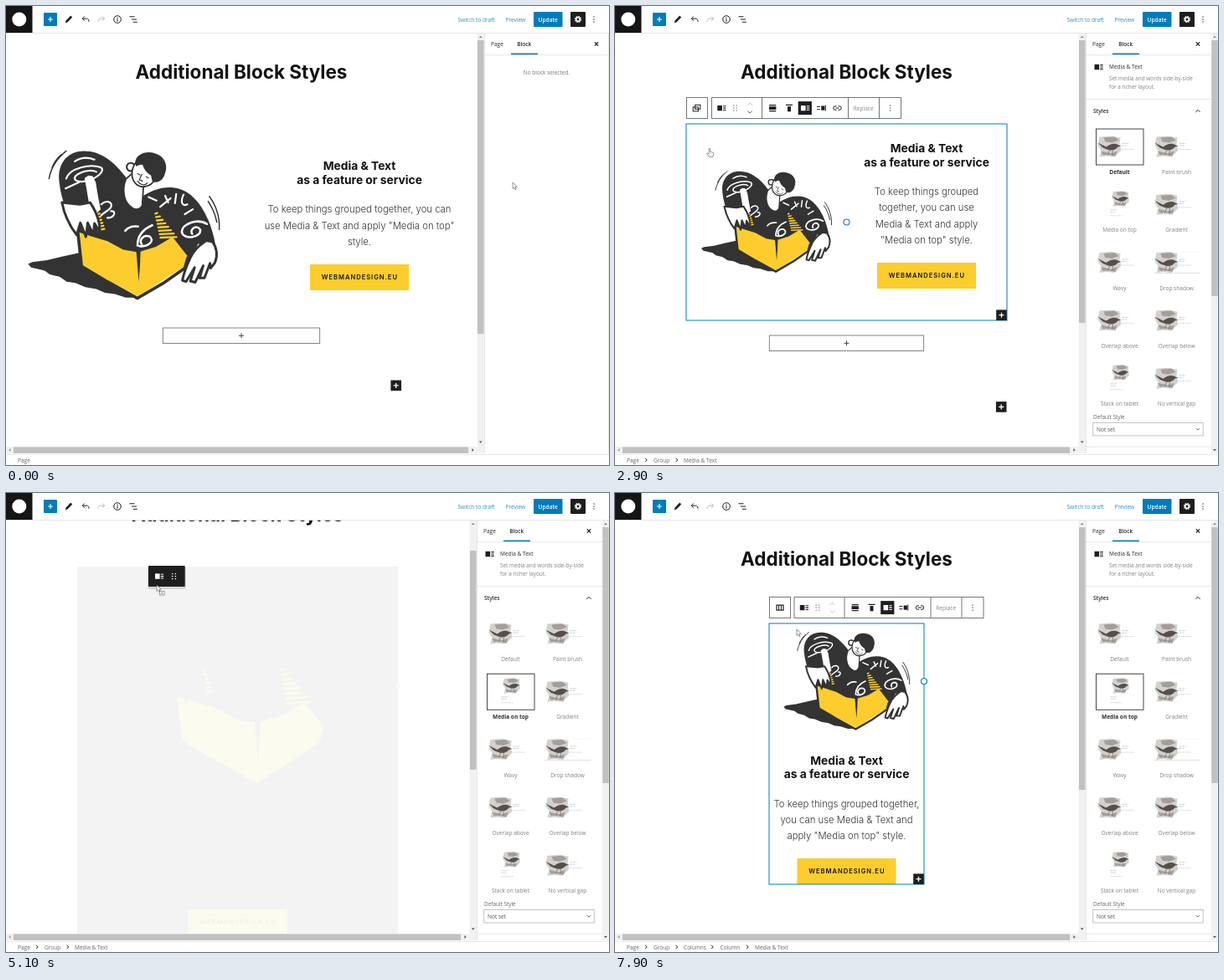
These frames come from a looping animation (720x549 px, 8000 ms). An HTML page:

```html
<!DOCTYPE html>
<html lang="en">
<head>
<meta charset="utf-8">
<title>Block editor</title>
<style>
html, body { margin: 0; width: 100%; height: 100%; overflow: hidden; background: #fff; }
svg { display: block; font: 6.55px "Open Sans", "Noto Sans", sans-serif; fill: #2c2c2c; }
.page { font-family: Inter, "Open Sans", sans-serif; text-anchor: middle; --ink: #333; --paper: #fff; --sun: #fccd2d; --text: #111; }
.ghost { --ink: #f3f3f3; --paper: #f3f3f3; --sun: #fbfbf0; --text: #f2f2e9; }
.ink { fill: var(--ink); }
.sun { fill: var(--sun); }
.line { fill: none; stroke: var(--ink); stroke-linecap: round; stroke-linejoin: round; }
.chalk { fill: none; stroke: var(--paper); stroke-linecap: round; }
.skin { fill: var(--paper); stroke: var(--ink); stroke-linejoin: round; }
</style>
</head>
<body>
<svg width="720" height="549" viewBox="0 0 720 549">
  <defs>
    <clipPath id="view"><rect id="viewBox" y="32.5" height="494.5"/></clipPath>
    <g id="art">
      <path class="ink" d="M121 347 L128 344 L152 341 L176 335 L204 329 L211 351 L298 402 L280 402 L262 396 L246 394 L232 388 L214 385 L198 378 L184 376 L172 368 L156 364 L148 358 L126 353Z"/>
      <path class="line" stroke-width="2" d="M155 208 C158 192 168 175 183 163 M160 190 C164 180 170 173 175 169 M416 237 C427 252 433 272 432 291 M414 245 C422 257 426 268 428 279"/>
      <path class="ink" d="M172 216 C167 185 184 163 212 163 C240 163 262 181 281 207 L306 238 C322 226 346 218 368 225 C394 233 412 264 420 292 C426 312 428 322 421 326 L398 314 L384 340 L357 320 L300 350 L206 310 C190 277 175 246 172 216Z"/>
      <path class="chalk" stroke-width="3" d="M197 180 C207 173 219 173 229 177 M183 208 C188 191 222 183 240 190 C249 199 216 219 199 211 C188 203 219 190 232 197 M182 224 L204 214 M240 250 C248 242 259 246 256 254 C253 260 244 263 240 268 M250 272 C262 272 265 260 256 261 M317 238 L330 244 M336 254 L353 240 M344 236 L349 247 M362 233 L360 248 M374 234 C368 246 372 254 380 250 M376 266 L389 258"/>
      <path class="chalk" stroke-width="3.5" d="M412 282 C396 272 371 282 371 295 C374 309 404 304 401 291 C395 282 383 291 388 298 M299 317 C299 300 309 290 323 284 M302 318 C318 320 328 308 318 302 C308 299 301 309 306 315 M279 293 C284 287 292 285 300 286"/>
      <path d="M213 207 L219 203 L226 204 L231 214 L235 238 L239 258 L232 265 L222 260Z" fill="var(--paper)"/>
      <g id="stripes" stroke="var(--sun)" stroke-width="3.2" stroke-linecap="round"></g>
      <path class="sun" d="M202 295 L224 302 L250 310 L276 324 L300 328 L329 319 L356 303 L381 335 L374 352 L300 400 L208 351Z"/>
      <path class="line" stroke-width="5" d="M202 296 L208 351 L250 376 L299 403 L340 379 L376 354 L381 337"/>
      <path class="ink" d="M297 326 L304 325 L303 350 L301 376 L299 350Z"/>
      <path class="skin" stroke-width="4" d="M176 247 C180 268 188 284 200 300 L206 280 L215 303 L218 280 L227 299 L229 281 L238 295 C238 280 232 262 222 247 L205 250Z"/>
      <path class="skin" stroke-width="4" d="M411 309 C399 317 390 325 385 337 C379 350 374 363 372 374 L378 376 L392 353 L385 375 L393 377 L406 350 L400 370 L408 370 L417 346 L418 354 L425 345 C430 333 428 320 421 311Z"/>
      <path class="skin" stroke-width="2.5" d="M280 209 C273 228 277 248 291 256 C299 261 308 256 307 246 L309 216 L292 198Z"/>
      <circle class="skin" cx="288" cy="189" r="6.5" stroke-width="3"/>
      <path class="skin" stroke-width="2.5" d="M295 183 C288 195 288 209 297 217 C306 225 321 221 327 210 L325 186Z"/>
      <path class="ink" d="M295 184 C295 167 314 162 328 167 C343 171 349 186 344 199 C341 212 330 217 323 212 L321 203 C313 198 309 192 307 184 L297 188Z"/>
      <path class="line" stroke-width="1.6" d="M299 200 L303 202 M313 205 L317 207 M306 201 L302 210 L307 212 M299 212 C304 219 311 220 315 215"/>
    </g>
    <g id="photo">
      <path fill="#d3d0cd" d="M-24 -12 L-10 -13 L1 -11 L0 -3 L2 4 L-3 9 L-6 12 L-16 11 L-24 12 L-22 4 L-26 -2Z"/>
      <path fill="#a29e9a" d="M-19 -11 L-6 -12 L-1 -8 L-9 -5 L-17 -6Z M-22 5 L-10 8 L-3 5 L-5 11 L-14 9 L-20 10Z"/>
      <path fill="#56504c" d="M-26 -5 L-16 0 C-11 -4 -5 -5 -1 -2 L2 -1 L-2 0 C-5 4 -10 5 -15 3 L-20 1Z"/>
      <path fill="none" stroke="#77706b" stroke-width=".8" d="M-12 4 L-14 10 M-8 4 L-9 10"/>
    </g>
    <g id="tiny" fill="none" stroke="#bbb" stroke-width=".7"><path d="M0 0h8M0 2.5h6" stroke-dasharray="3 .7"/><path d="M0 7h14" stroke-dasharray="1.5 1"/></g>
  </defs>
  <g id="scene"></g>
</svg>
<script>
const LOOP = 8000, BLUE = '#007cba', DARK = '#1e1e1e', EDGE = '#777';
const $ = id => document.getElementById(id);

const rect = (x, y, w, h, fill, more = '') => `<rect x="${x}" y="${y}" width="${w}" height="${h}" fill="${fill}" ${more}/>`;
const frame = (x, y, w, h, color = DARK, sw = .8, fill = 'none') => rect(x, y, w, h, fill, `stroke="${color}" stroke-width="${sw}"`);
const text = (x, y, s, more = '') => `<text x="${x}" y="${y}" ${more}>${s}</text>`;
const path = (x, y, d, color = DARK, sw = 1) => `<path transform="translate(${x} ${y})" d="${d}" fill="none" stroke="${color}" stroke-width="${sw}"/>`;
const shape = (x, y, d, fill = DARK) => `<path transform="translate(${x} ${y})" d="${d}" fill="${fill}"/>`;
const use = (id, x, y, s = 1) => `<use href="#${id}" transform="translate(${x} ${y}) scale(${s})"/>`;
const plus = (x, y, r, color, sw = 1) => path(x, y, `M${-r} 0H${r}M0 ${-r}V${r}`, color, sw);
const inserter = (x, y) => rect(x - 6.3, y - 6.3, 12.6, 12.6, DARK) + plus(x, y, 3, '#fff', 1.3);
const dots = (x, y, cols, gap, color = DARK) => {
  let d = '';
  for (let c = 0; c < cols; c++) for (let r = -1; r < 2; r++) d += `M${(c - (cols - 1) / 2) * gap - .7} ${r * 3 - .7}h1.4v1.4h-1.4z`;
  return shape(x, y, d, color);
};
const mediaIcon = (x, y, color = DARK) => shape(x, y, 'M-5 -3.2h5.6v6.4h-5.6z', color) + path(x, y, 'M1.8 -2.4h3.4M1.8 0h3.4M1.8 2.4h3.4', color, 1.1);

// Piecewise linear value from [time, x, y...] keys.
function along(keys, t) {
  const i = keys.findIndex(k => k[0] > t);
  if (i === 0) return keys[0].slice(1);
  if (i < 0) return keys[keys.length - 1].slice(1);
  const a = keys[i - 1], b = keys[i], u = (t - a[0]) / (b[0] - a[0]);
  return a.slice(1).map((v, n) => v + (b[n + 1] - v) * u);
}

const pointerKeys = [[0, 605, 211], [400, 200, 268], [1500, 200, 268], [1800, 103, 146], [2000, 103, 139], [2200, 103, 139],
  [2400, 113, 185], [2500, 113, 171], [3000, 113, 171], [3500, 606, 240], [3900, 606, 241], [4800, 143, 69], [5100, 180, 110],
  [5500, 250, 508], [5700, 264, 470], [6000, 270, 244], [6400, 273, 194], [7400, 273, 194], [7900, 217, 163]];
const chipKeys = [[4900, 137, 58], [5100, 170, 87], [5500, 235, 440], [5700, 262, 470], [6000, 274, 290], [6400, 274, 190], [6700, 272, 185]];
const scrollKeys = [[4000, 0], [4300, 53], [5200, 53], [5700, 362], [6000, 362], [6400, 405], [6900, 405], [7000, 123], [7400, 123], [7800, 0]];

// gap: from the last block down to the closing inserter
const states = [
  { until: 1200, w: 562, x: 0, bw: 562, top: 158, bottom: 367, art: [0, 157.3, .7337], head: [422, 191.2], size: 671, gap: 50.4,
    lines: ['To keep things grouped together, you can', 'use Media & Text and apply "Media on top"', 'style.'] },
  { until: 2700, w: 553, x: 0, bw: 553, top: 156, bottom: 372, art: [0, 160.4, .722], head: [415, 184.8], size: 693, gap: 67, outline: true,
    lines: ['To keep things grouped together, you can', 'use Media & Text and apply "Media on', 'top" style.'] },
  { until: 3700, w: 553, x: 85, bw: 383, top: 141, bottom: 376, art: [85, 186.7, .5], head: [372, 170], size: 697, gap: 67, outline: true,
    lines: ['To keep things grouped', 'together, you can use', 'Media & Text and apply', '"Media on top" style.'] },
  { until: 7000, w: 553, x: 85, bw: 383, top: 141, bottom: 582, art: [85, 141, 1], head: [276.5, 453], size: 900, gap: 67,
    lines: ['To keep things grouped together, you can use Media & Text and apply', '"Media on top" style.'] },
  { until: LOOP, w: 553, x: 184, bw: 185, top: 156, bottom: 468, art: [184, 156, .483], head: [276.5, 319.5], size: 750, gap: 67, outline: true, column: true,
    lines: ['To keep things grouped together,', 'you can use Media & Text and', 'apply "Media on top" style.'] }
];

function header() {
  return rect(0, 0, 720, 32, '#fff') + rect(0, 32, 720, .7, '#ddd') + rect(0, 0, 31.5, 32, '#151515') +
    '<circle cx="15.8" cy="16" r="8.5" fill="#fff"/>' +
    rect(45, 8, 16, 16, BLUE, 'rx="1"') + plus(53, 16, 3, '#fff', 1.2) +
    shape(75, 16, 'M-4.2 4.5L-3.2 1.2 2.2 -4.4 4.2 -2.6 -1.4 3.2Z') +
    path(95, 16, 'M-1.2 -3.4L-3.8 -.9 -1.2 1.6M-3.8 -.9H1.2C3.4 -.9 4 .6 4 2.8') +
    path(114, 16, 'M1.2 -3.4L3.8 -.9 1.2 1.6M3.8 -.9H-1.2C-3.4 -.9 -4 .6 -4 2.8', '#bbb') +
    '<circle cx="133" cy="16" r="4.3" fill="none" stroke="#1e1e1e"/>' + path(133, 16, 'M0 -2.4v1.2M0 -.4v2.8', DARK, 1.1) +
    path(152, 16, 'M-4.5 -3.2h6M-2 0h6M-.2 3.2h5', DARK, 1.1) +
    text(539.5, 18.8, 'Switch to draft', 'fill="#2b8fc4"') + text(596.5, 18.8, 'Preview', 'fill="#2b8fc4"') +
    rect(630, 7, 34.5, 18, BLUE, 'rx="1"') + text(647.2, 18.6, 'Update', 'fill="#fff" font-weight="600" text-anchor="middle"') +
    rect(674, 7, 18, 18, DARK, 'rx="1"') +
    '<circle cx="683" cy="16" r="2.3" fill="none" stroke="#fff" stroke-width="1.7"/><circle cx="683" cy="16" r="3.6" fill="none" stroke="#fff" stroke-width="1.2" stroke-dasharray="1.4 1.43"/>' +
    dots(702, 16, 1, 0, '#666');
}

function footer(names) {
  const xs = [14, 46, 82, 125.5, 167], seps = [37, 73.5, 116, 158];
  return rect(0, 535, 720, 14, '#fff') + rect(0, 536, 720, .7, '#ddd') + names.map((n, i) =>
    text(xs[i], 545.6, n, 'fill="#666"') + (i ? path(seps[i - 1], 543, 'M-1 -2.2L1.2 0 -1 2.2') : '')).join('');
}

function scrollbars(s, scroll) {
  const x = s.w + .5, ratio = 476 / s.size, up = 'M-2 1L0 -1.2 2 1Z', down = 'M-2 -1L0 1.2 2 -1Z', grey = '#555';
  return rect(x, 32.5, 8.5, 502.5, '#f1f1f1') + rect(x + .5, 41 + scroll * ratio, 7.5, 495 * ratio, '#c1c1c1') +
    shape(x + 4.2, 37, up, '#888') + shape(x + 4.2, 521.5, down, grey) +
    rect(0, 527, x, 8, '#f1f1f1') + rect(9, 527.5, s.w - 19, 7.5, '#c1c1c1') +
    shape(4.5, 531, 'M1 -2L-1.2 0 1 2Z', '#999') + shape(s.w - 4.5, 531, 'M-1 -2L1.2 0 -1 2Z', grey);
}

function tabs(x) {
  return text(x + 8, 48, 'Page') + text(x + 39.2, 48, 'Block', 'font-weight="600"') + rect(x + 32, 56.5, 32, 1.6, BLUE) +
    rect(x, 58.4, 720 - x, .7, '#ddd') + path(x + 134, 45.3, 'M-2.2 -2.2L2.2 2.2M-2.2 2.2L2.2 -2.2', DARK, 1.1);
}

const styleNames = ['Default', 'Paint brush', 'Media on top', 'Gradient', 'Wavy', 'Drop shadow', 'Overlap above', 'Overlap below', 'Stack on tablet', 'No vertical gap'];

function sidebar(t, open) {
  const x = open ? 562 : 571;
  let out = rect(x, 32.7, 720 - x, 503, '#fff') + rect(x, 32.7, .7, 503, '#ddd') + tabs(x);
  if (!open) return out + text(645.5, 82.4, 'No block selected.', 'text-anchor="middle" fill="#777"') + rect(719.3, 32, .7, 504, '#ddd');
  const grey = 'fill="#808080"', chosen = t < 3700 ? 0 : 2;
  out += mediaIcon(577.5, 73) + text(590, 75.4, 'Media & Text', 'font-weight="500"') +
    text(590, 88.8, 'Set media and words side-by-side', grey + ' font-size="6.4"') + text(590, 98.9, 'for a richer layout.', grey + ' font-size="6.4"') +
    rect(562, 111.2, 150, .7, '#ddd') + text(571, 128, 'Styles', 'font-weight="600"') + path(696, 125.5, 'M-2.6 1.4L0 -1.2 2.6 1.4');
  styleNames.forEach((name, i) => {
    const cx = 602.5 + i % 2 * 68, cy = 168.5 + (i >> 1) * 69.3, stacked = i === 2 || i === 8;
    if (stacked) out += use('photo', cx + 10, cy - 7, .74) + use('tiny', cx - 11, cy + 6);
    else out += use('photo', cx, cy) + use('tiny', cx + 3, cy - 4);
    if (i === 5) out += rect(cx - 27, cy + 12, 55, .6, '#ccc') + rect(cx - 3, cy - 13, 31, .5, '#eee');
    if (i === chosen) out += frame(cx - 28, cy - 21.5, 56.5, 43, '#333', .9);
    out += text(cx, cy + 32.4, name, `text-anchor="middle" ${i === chosen ? 'font-weight="700"' : grey}`);
  });
  if (t >= 3700 && t < 4900) out += rect(570.5, 212, 64.5, 66, 'none', `rx="1" stroke="${BLUE}"`);
  return out + text(571, 494, 'Default Style', 'fill="#666" font-size="6.4"') + frame(570.8, 498.6, 131.4, 15.4, '#aaa', .7) +
    text(575, 508.6, 'Not set', 'fill="#555"') + path(696, 506.2, 'M-2 -1L0 1 2 -1', '#666') + rect(562, 526.8, 150, .7, '#ddd') +
    rect(711.8, 32.7, 8.2, 503, '#f1f1f1') + rect(712.3, 41, 7.4, 306, '#c1c1c1') +
    shape(716, 37, 'M-2 1L0 -1.2 2 1Z', '#888') + shape(716, 531, 'M-2 -1L0 1.2 2 -1Z', '#555');
}

function toolbar(s, y, t) {
  const x = s.x + (s.column ? 29.5 : 30), m = y + 12.6, align = t >= 1800 && t < 2700 ? BLUE : DARK;
  const split = dx => rect(x + dx, y, 1, 25, EDGE);
  const owner = s.column
    ? frame(s.x + 9, m - 3, 8, 6, DARK, 1.2) + path(s.x + 13, m, 'M-1.4 -3v6M1.4 -3v6', DARK, 1)
    : frame(s.x + 10.6, m - 3.8, 6.2, 5, DARK, 1) + frame(s.x + 8.2, m - 1.2, 6.2, 5, DARK, 1);
  const wide = t < 2700 ? 'M-3.5 -4.2h7M-3.5 4.2h7' : 'M-4 -3.5h8M-4 3.5h8';
  return frame(s.x + .5, y, 25, 25, EDGE, 1, '#fff') + owner + frame(x + .5, y, 226, 25, EDGE, 1, '#fff') +
    mediaIcon(x + 12.3, m) + dots(x + 28.5, m, 2, 3.6, '#888') +
    path(x + 46, m, 'M-2.8 -3.4L0 -6 2.8 -3.4', '#bbb', .9) + path(x + 46, m, 'M-2.8 3.4L0 6 2.8 3.4', s.column ? '#bbb' : '#555', .9) +
    split(60) + rect(x + 69, m - 1.9, 8.4, 3.8, align) + path(x + 73.2, m, wide, align, 1.1) +
    path(x + 93, m, 'M-4 -3.8h8', DARK, 1.2) + rect(x + 91, m - 2, 4, 6.2, DARK) +
    rect(x + 103.7, m - 8, 16.2, 16, DARK) + mediaIcon(x + 112, m, '#fff') +
    rect(x + 131.2, m - 2.6, 4.2, 5.2, DARK) + path(x + 131, m, 'M-5 -1.6h3.8M-5 1.6h3.8', DARK, 1) + rect(x + 135.8, m - 3.5, 1, 7, DARK) +
    path(x + 150.5, m, 'M-1 -2.3h-1.4a2.3 2.3 0 0 0 0 4.6h1.4M1 -2.3h1.4a2.3 2.3 0 0 1 0 4.6h-1.4M-2 0h4') +
    split(163) + text(x + 169.8, m + 2.4, 'Replace', 'fill="#888"') + split(200) + dots(x + 213.5, m, 1, 0, '#666');
}

function alignMenu(t) {
  const row = (y, name, on) => (on ? rect(94, y - 9, 72, 18, '#f0f0f0') : '') +
    rect(99.5, y - 1.8, 8, 3.6, DARK) + path(103.5, y, 'M-3.5 -4h7M-3.5 4h7') + text(113, y + 2.3, name);
  return frame(91.5, 153.5, 78, 46, EDGE, 1, '#fff') + row(165, 'Wide width', t >= 2500) + row(187, 'Full width', t < 2500);
}

function block(s, ghost, selected) {
  const [hx, hy] = s.head, last = hy + 52 + (s.lines.length - 1) * 19.3, by = Math.round(last + 27);
  const bold = 'font-size="13.8" font-weight="700" fill="var(--text)"';
  let out = ghost ? rect(s.x, s.top, s.bw, s.bottom - s.top, '#f3f3f3') : '';
  const [ax, ay, k] = s.art;
  out += `<use href="#art" transform="translate(${ax} ${ay}) scale(${k}) translate(-85 -141)"/>`;
  if (!ghost) {
    out += text(hx, hy + 5, 'Media & Text', bold) + text(hx, hy + 21.7, 'as a feature or service', bold);
    s.lines.forEach((l, i) => out += text(hx, hy + 56 + i * 19.3, l, 'font-size="11.3" font-weight="300" fill="#333"'));
  }
  out += rect(hx - 59, by, 118, 31, 'var(--sun)') +
    text(hx + .4, by + 18.2, 'WEBMANDESIGN.EU', 'font-size="7.6" font-weight="600" letter-spacing=".95" fill="var(--text)"');
  if (selected) {
    if (s.outline) out += s.x ? frame(s.x, s.top, s.bw, s.bottom - s.top, BLUE, 1)
      : rect(0, s.top - .5, s.bw, 1, '#3f7fb5') + rect(0, s.bottom - .5, s.bw, 1, '#3f7fb5');
    out += `<circle cx="${ax + 383 * k}" cy="${ay + 143.5 * k}" r="3.5" fill="#fff" stroke="${BLUE}" stroke-width="1.1"/>` +
      inserter(s.x + s.bw - 6.5, s.bottom - 6.3);
  } else if (ghost) out += '<circle cx="468" cy="284.5" r="3" fill="#fafafa"/>';
  return `<g class="${ghost ? 'ghost' : ''}">${out}</g>`;
}

function canvas(s, t, scroll) {
  const ghost = t >= 4900 && t < 7000, selected = t >= 1200 && !ghost, mid = s.w / 2;
  let out = text(mid, 87, 'Additional Block Styles', 'font-size="22.5" font-weight="700" fill="#111"') + block(s, ghost, selected);
  let end = s.bottom;
  if (!s.column) {
    const y = s.bottom + 18, w = s.w / 3;
    out += frame(mid - w / 2, y, w, 18.5, EDGE, .9, '#fff') + plus(mid, y + 9.3, 3, '#444', 1);
    end = y + 18.5;
  }
  out += inserter(mid + 184.7, end + s.gap);
  if (t >= 5800 && t < 6300) out += rect(9, 634, 535, 2.5, '#b1cfe8');
  out = `<g class="page" transform="translate(0 ${-scroll})">${out}</g>`;
  if (selected) out += toolbar(s, Math.max(39.5, s.top - 31.5 - scroll), t);
  if (t >= 2100 && t < 2700) out += alignMenu(t);
  return `<g clip-path="url(#view)">${out}</g>`;
}

function chip(t) {
  if (t < 4900 || t >= 7000) return '';
  const [x, y] = along(chipKeys, t);
  return rect(x - 1, y + 1, 46, 27, '#000', 'opacity=".12" rx="2"') + rect(x, y, 43.7, 25, DARK, 'rx="1"') +
    mediaIcon(x + 13, y + 12.6, '#fff') + dots(x + 30.5, y + 12.6, 2, 3.8, '#fff');
}

function pointer(t) {
  const [x, y] = along(pointerKeys, t), look = 'fill="#fff" stroke="#666" stroke-width=".7" stroke-linejoin="round"';
  const hand = t >= 1800 && t < 3100 || t >= 3500 && t < 4100;
  const d = hand ? 'M-.8 0C-.8 -1 .8 -1 .8 0V3.4L4 4.2C5 4.6 5 5.4 4.6 7L3.8 9.4H-.8L-3.4 5.6C-3.4 4.6 -2.4 4.6 -.8 6Z'
    : 'M0 0V7.4L1.8 5.9 3 8.6 4.2 8.1 3 5.4H5.2Z';
  return `<path transform="translate(${x} ${y})" d="${d}" ${look}/>` +
    (t >= 4900 && t < 5600 ? frame(x + 3.5, y + 7.5, 5.5, 4.5, '#777', .7, '#fff') + plus(x + 6.2, y + 9.8, 1.3, '#777', .7) : '');
}

function draw(t) {
  const s = states.find(v => t < v.until), [scroll] = along(scrollKeys, t), open = t >= 1200;
  $('viewBox').setAttribute('width', s.w + .5);
  const crumbs = !open ? ['Page'] : s.column ? ['Page', 'Group', 'Columns', 'Column', 'Media & Text'] : ['Page', 'Group', 'Media & Text'];
  $('scene').innerHTML = rect(0, 0, 720, 549, '#fff') + canvas(s, t, scroll) + scrollbars(s, scroll) +
    sidebar(t, open) + header() + footer(crumbs) + chip(t) + pointer(t);
}

let stripes = '';
for (let i = 0; i < 6; i++) stripes += `<path d="M${230 + i} ${267 + i * 5}l${7 + i * .6} -2"/>`;
for (let i = 0; i < 8; i++) stripes += `<path d="M${328 + i * 1.2} ${265 + i * 5.6}l${3 + i * 3.3} -1"/>`;
$('stripes').innerHTML = stripes;

// The picture advances in steps of 100 ms.
let shown = -1;
function tick(now) {
  const t = Math.floor(now % LOOP / 100) * 100;
  if (t !== shown) draw(shown = t);
  requestAnimationFrame(tick);
}
draw(0);
requestAnimationFrame(tick);
</script>
</body>
</html>
```
